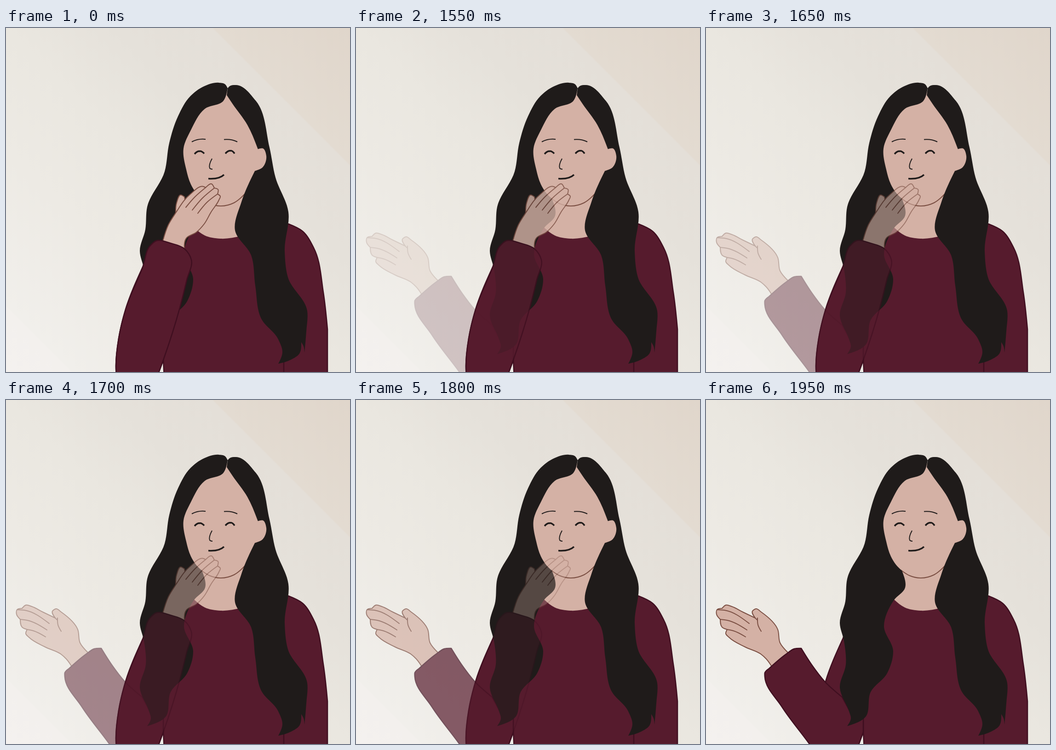
An HTML page for the animation above (4950 ms loop, 748 by 748 pixels).

```html
<!DOCTYPE html>
<html lang="en">
<head>
<meta charset="utf-8">
<title>Gesture</title>
<style>
  html, body { margin: 0; width: 100%; height: 100%; overflow: hidden; }
  body {
    background: linear-gradient(45deg,
      #f4f1ef 0%, #f3f0ed 9.5%, #f1efeb 9.7%, #edeae4 32%, #eae7e0 50%,
      #e5e1da 66%, #e4dfd8 79.9%, #e3dbd1 80.2%, #e0d6cb 100%);
  }
  svg { display: block; width: 100%; height: 100%; }
  path { fill: none; stroke-linejoin: round; }
  .skin { fill: #d4b1a5; }
  .wool { fill: #561b2d; }
  .hair { fill: #1f1b1a; }
  .edge { stroke: #3f0f20; stroke-width: 2.5; }
  .crease { stroke: #7b4f43; stroke-width: 2; stroke-linecap: round; }
  .thin { stroke: #1f1b1a; stroke-width: 2; }
  .bold { stroke: #1f1b1a; stroke-width: 3.5; }

  .open, .raised { animation: show 4950ms infinite; }
  .raised { animation-name: hide; }
  /* ten 50 ms steps, the first one taken at 1500 ms */
  @keyframes show {
    0% { opacity: 0; }
    30.303% { opacity: 0; animation-timing-function: steps(10, start); }
    40.403%, 100% { opacity: 1; }
  }
  @keyframes hide {
    0% { opacity: 1; }
    30.303% { opacity: 1; animation-timing-function: steps(10, start); }
    40.403%, 100% { opacity: 0; }
  }
</style>
</head>
<body>
<svg viewBox="0 0 748 748">
  <!-- sweater -->
  <path class="wool edge" data-pts="400 430 / 505 440 / 614 426 / 645 442 669 478 690 575 699 655 / 699 760 / 344 760 / 342 722 / 331 752 / 331 760 / 240 760 / 239 735 245 675 260 612 298 518 / 320 450"/>
  <path class="edge" d="M342 685V722M604 722V750"/>

  <!-- open arm -->
  <g class="open">
    <path class="skin crease" data-pts="148 588 / 131 563 120 553 85 537 50 516 43 508 46 499 / 35 494 31 477 / 23 466 24 456 35 453 / 43 446 56 449 80 461 107 474 / 101 459 109 454 120 461 156 499 161 528 179 550 / 190 560"/>
    <path class="crease" data-pts="24 456 40 457 94 486; 31 477 46 479 89 500; 46 499 60 502 86 515; 107 474 111 478; 112 474 113 489 120 503"/>
    <path class="wool edge" data-pts="235 762 225 748 165 667 128 602 128 593 137 584 / 175 552 192 541 207 540 / 230 576 258 612 296 646 / 320 690 / 342 690 / 342 722 / 331 752 / 331 762"/>
  </g>

  <!-- face and neck -->
  <path class="skin" data-pts="481 138 / 430 160 / 380 230 / 380 270 / 392 335 / 420 372 / 430 405 / 409 434 / 432 451 466 458 512 452 / 530 362 / 550 311 / 556 262 / 530 190"/>
  <path class="crease" data-pts="424 370 443 382 466 387 496 380 520 360"/>
  <path class="thin" d="M404 247.500Q418 240 434 242M474 242.500Q490 241 503 247.500M448 284C443 293 441 300 443 305Q445 307 449 307"/>
  <path class="bold" d="M410 274Q416 267 421 268Q425 267 431 273M477 273Q483 266 488 267Q492 266 497 273M440 327.500Q464 329 474 319"/>

  <!-- hair -->
  <path class="hair" data-pts="482 131 476 122 463 119 430 127 401 148 374 192 355 250 345 312 307 389 303 438 291 485 300 524 304 575 291 625 311 677 315 692 307 709 / 347 689 358 635 394 594 407 546 387 492 408 436 433 408 426 371 / 413 358 402 340 392 308 386 262 402 222 432 176 473 158 482 131"/>
  <path class="hair" data-pts="482 131 487 126 500 124 543 158 573 260 586 325 614 400 606 485 613 542 655 615 653 660 649 706 / 647 692 642 683 / 638 708 620 721 592 730 / 601 705 592 677 555 632 542 560 533 494 498 440 512 378 541 311 / 548 264 / 525 211 492 164 480 146"/>
  <path class="skin" data-pts="546 264 / 559 262 566 278 558 303 540 311 / 534 290"/>

  <!-- raised arm -->
  <g class="raised">
    <path class="skin crease" data-pts="369 405 / 371 380 380 363 388 367 / 391 385"/>
    <path class="skin crease" data-pts="338 478 / 341 463 / 353 428 369 402 400 362 430 345 434 347 / 447 339 453 348 / 461 351 460 361 / 466 366 463 374 446 400 431 426 414 444 392 457 389 490"/>
    <path class="crease" data-pts="434 347 411 367 391 390; 453 348 427 370 405 396; 460 361 437 379 417 403"/>
    <path class="wool edge" data-pts="240 760 239 735 245 675 260 612 298 518 313 474 326 463 358 468 388 480 403 504 393 548 378 608 342 722 331 752 / 331 760 / 240 760"/>
  </g>
</svg>
<script>
  const add = (a, b, k = 1) => [a[0] + b[0] * k, a[1] + b[1] * k];
  const mul = (a, k) => [a[0] * k, a[1] * k];

  // Smooth curve through points, with handles weighted by chord length.
  function curve(pts) {
    const n = pts.length - 1;
    const len = [], dir = [], tan = [];
    for (let i = 0; i < n; i++) {
      const v = add(pts[i + 1], pts[i], -1);
      len[i] = Math.hypot(...v);
      dir[i] = mul(v, 1 / len[i]);
    }
    for (let i = 1; i < n; i++) {
      const w = len[i] / (len[i - 1] + len[i]);
      tan[i] = add(mul(dir[i - 1], w), dir[i], 1 - w);
    }
    const end = (d, t) => t ? add(mul(d, 1.5), t, -0.5) : d;
    const inner = tan.slice();
    tan[0] = end(dir[0], inner[1]);
    tan[n] = end(dir[n - 1], inner[n - 1]);
    return dir.map((_, i) => {
      const a = add(pts[i], tan[i], len[i] / 3);
      const b = add(pts[i + 1], tan[i + 1], -len[i] / 3);
      return `C${a} ${b} ${pts[i + 1]}`;
    }).join('');
  }

  // "/" turns the point before it into a corner.
  function outline(text) {
    let last, d = '';
    for (const run of text.split('/')) {
      const nums = run.trim().split(/\s+/).map(Number);
      const pts = last ? [last] : [];
      for (let i = 0; i < nums.length; i += 2) pts.push([nums[i], nums[i + 1]]);
      if (!last) d = 'M' + pts[0];
      if (pts.length > 1) d += curve(pts);
      last = pts[pts.length - 1];
    }
    return d;
  }

  for (const el of document.querySelectorAll('[data-pts]')) {
    el.setAttribute('d', el.dataset.pts.split(';').map(outline).join(''));
  }
</script>
</body>
</html>
```
